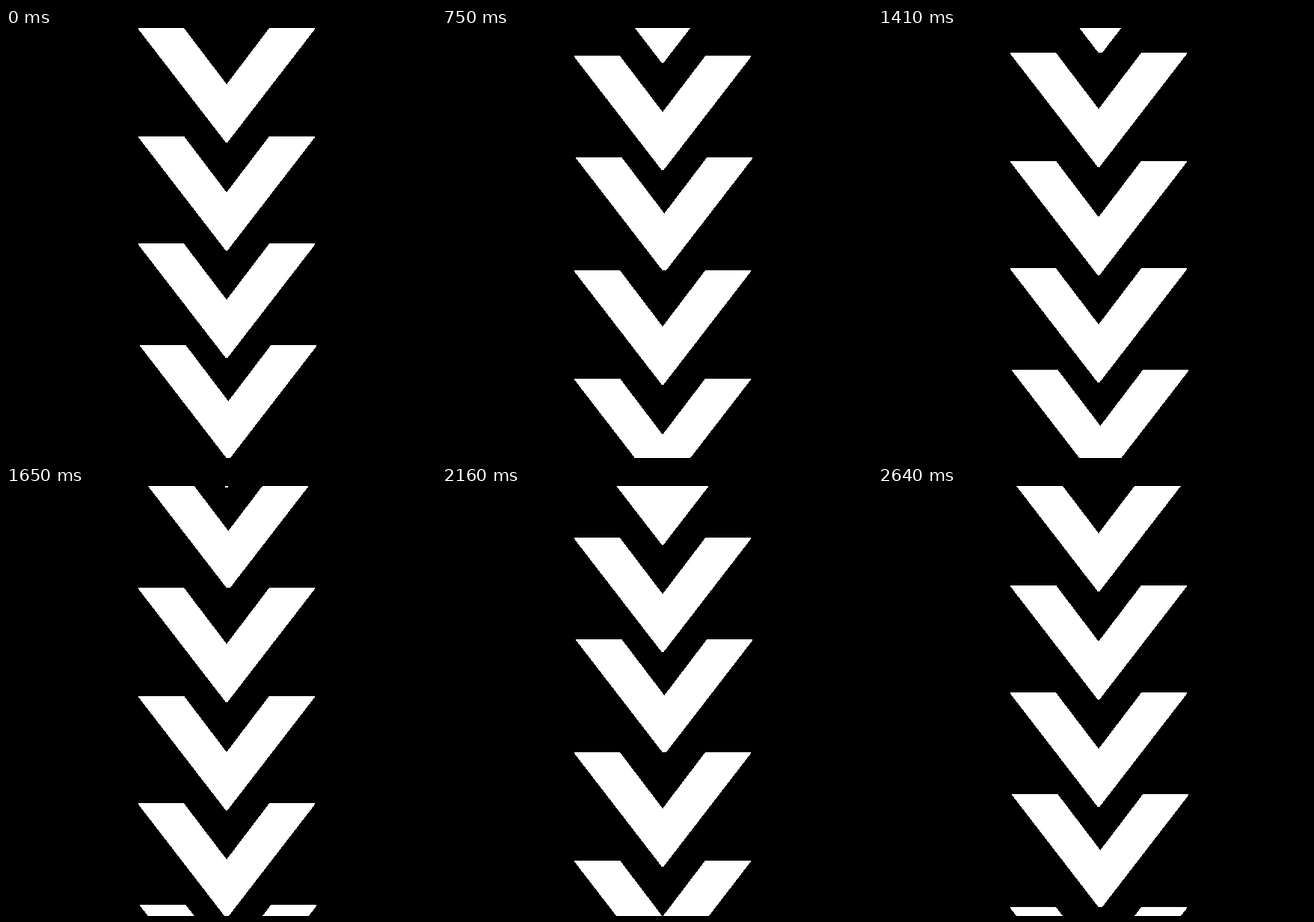
An HTML page for the animation above (2670 ms loop, 575 by 575 pixels).

```html
<!DOCTYPE html>
<html lang="en">
<head>
<meta charset="utf-8">
<title>Falling chevrons</title>
<style>
  html, body { margin: 0; width: 100%; height: 100%; overflow: hidden; background: #000; }
  svg { display: block; width: 100vw; height: 100vh; }
</style>
</head>
<body>
<svg viewBox="0 0 575 575" fill="#fff" shape-rendering="crispEdges">
  <defs>
    <clipPath id="edge"><rect width="575" height="575"/></clipPath>
    <path id="chevron" d="M177 0H238L295 75L352 0H413V1.4L296 153H294L177 1.4Z"/>
    <g id="tile" clip-path="url(#edge)">
      <use href="#chevron" y="0.2"/>
      <use href="#chevron" y="144.8"/>
      <use href="#chevron" y="288.4"/>
      <use href="#chevron" x="2.3" y="424"/>
    </g>
  </defs>
  <g id="strip">
    <use href="#tile" y="-575"/>
    <use href="#tile"/>
  </g>
</svg>
<script>
  const LOOP = 2670, STEP = 30, TILE = 575;
  const strip = document.getElementById('strip');

  // Two tiles scroll by per loop, in steps rounded up to whole pixels.
  function draw() {
    const step = Math.floor((performance.now() % LOOP) / STEP);
    const y = Math.ceil(step * STEP / LOOP * 2 * TILE) % TILE;
    strip.setAttribute('transform', `translate(0 ${y})`);
    requestAnimationFrame(draw);
  }
  draw();
</script>
</body>
</html>
```
